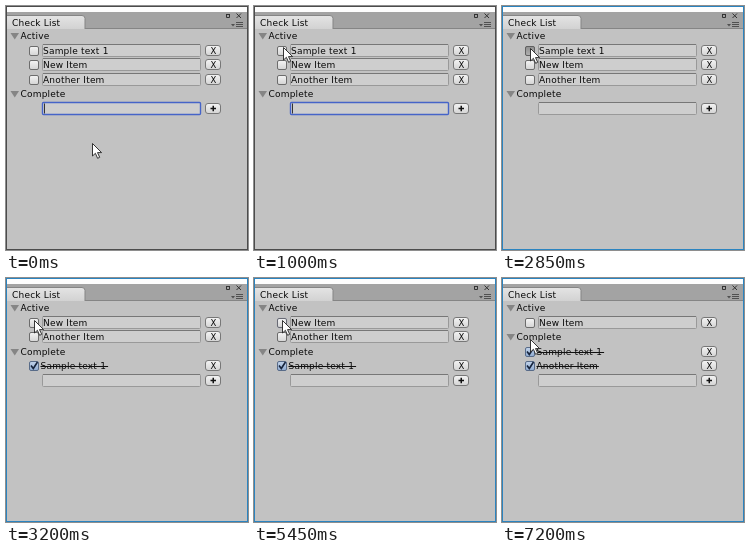
Animation of 242x244 px, one loop 8 s. Source, as an HTML page:

```html
<!DOCTYPE html>
<html lang="en">
<head>
<meta charset="utf-8">
<title>Check List</title>
<style>
html, body { margin: 0; width: 100%; height: 100%; overflow: hidden; background: #c2c2c2; }
svg { display: block; width: 242px; height: 244px; }
text { font: 9px "DejaVu Sans", Verdana, sans-serif; letter-spacing: .2px; fill: #080808; white-space: pre; }
.btn { font-size: 8.5px; letter-spacing: 0; text-anchor: middle; }
.anim { animation: 8s step-end infinite; }
#start { animation-name: start; }
#one { animation-name: one; }
#two { animation-name: two; }
#focus { animation-name: focus; }
#blur { animation-name: blur; }
#caret { animation-name: caret; }
#press1 { animation-name: press1; }
#press2 { animation-name: press2; }
#ring { animation: ring 8s linear infinite; }
#arrow { animation-name: arrow; }
#beam { animation-name: beam; }
#edge { animation-name: edge; }
@keyframes start { 0% { opacity: 1 } 38.125%, 100% { opacity: 0 } }
@keyframes one { 0% { opacity: 0 } 38.125% { opacity: 1 } 83.75%, 100% { opacity: 0 } }
@keyframes two { 0% { opacity: 0 } 83.75%, 100% { opacity: 1 } }
@keyframes focus { 0% { opacity: 1 } 35.625%, 100% { opacity: 0 } }
@keyframes blur { 0% { opacity: 0 } 35.625%, 100% { opacity: 1 } }
@keyframes caret { 0% { opacity: 1 } 8.125% { opacity: 0 } 12.5% { opacity: 1 } 15.625% { opacity: 0 } 23.75%, 100% { opacity: 1 } }
@keyframes press1 { 0% { opacity: 0 } 35.625%, 100% { opacity: 1 } }
@keyframes press2 { 0% { opacity: 0 } 81.25%, 100% { opacity: 1 } }
@keyframes ring { 0%, 43.75% { opacity: 0 } 46.25%, 62.5% { opacity: 1 } 68.75%, 100% { opacity: 0 } }
@keyframes edge { 0% { stroke: #4c4c4c } 35.625%, 100% { stroke: #2b84c0 } }
@keyframes beam { 0% { opacity: 0 } 4.375% { opacity: 1 } 6.25%, 100% { opacity: 0 } }
@keyframes arrow {
  0% { transform: translate(86px, 137px); opacity: 1 }
  2.5% { transform: translate(36px, 80px); opacity: 1 }
  4.375% { transform: translate(36px, 80px); opacity: 0 }
  6.25% { transform: translate(26px, 60px); opacity: 1 }
  8.125% { transform: translate(33px, 47px); opacity: 1 }
  8.75% { transform: translate(33px, 43px); opacity: 1 }
  10.625% { transform: translate(29px, 41px); opacity: 1 }
  15% { transform: translate(28px, 42px); opacity: 1 }
  71.25% { transform: translate(28px, 59px); opacity: 1 }
  73.125%, 100% { transform: translate(28px, 61px); opacity: 1 }
}
</style>
</head>
<body>
<svg id="stage" viewBox="0 0 242 244">
  <defs>
    <linearGradient id="light" x2="0" y2="1">
      <stop stop-color="#f4f4f4"/><stop offset="1" stop-color="#d4d4d4"/>
    </linearGradient>
    <linearGradient id="dark" x2="0" y2="1">
      <stop stop-color="#8f8f8f"/><stop offset="1" stop-color="#b0b0b0"/>
    </linearGradient>
    <linearGradient id="blue" x2="0" y2="1">
      <stop stop-color="#c2d3ea"/><stop offset="1" stop-color="#8fabd2"/>
    </linearGradient>
    <linearGradient id="tab" x2="0" y2="1">
      <stop stop-color="#e4e4e4"/><stop offset="1" stop-color="#d2d2d2"/>
    </linearGradient>
  </defs>
  <path fill="#c2c2c2" d="M0 0h242v244H0z"/>
  <path fill="#fdfdfd" d="M1 1h240v5H1z"/>
  <path fill="#a3a3a3" d="M1 6h240v17H1z"/>
  <path stroke="#858585" d="M79 22.500H241"/>
  <path fill="url(#tab)" stroke="#858585" d="M.5 23V9.500H76q3 0 3 3V23"/>
  <text x="6" y="20">Check List</text>
  <g fill="none" stroke="#333">
    <path d="M220.500 8.500h3v3h-3zM220 8.500h4M230.500 7.500l4.500 4.500M235 7.500l-4.500 4.500"/>
    <path d="M230 16.500h7M230 18.500h7M230 20.500h7" stroke="#505050"/>
  </g>
  <path fill="#505050" d="M225 18h4l-2 2.500z"/>
  <g id="ui"></g>
  <rect class="anim" id="edge" x=".5" y=".5" width="241" height="243" fill="none"/>
  <path class="anim" id="beam" fill="none" stroke="#222" d="M43.500 95.500h2l1 1 1-1h2M46.500 96.500v12M43.500 109.500h2l1-1 1 1h2"/>
  <path class="anim" id="arrow" fill="#fff" stroke="#222" stroke-width=".9" d="M.5.5V13l2.900-2.700 2.200 5 2.100-1-2.200-4.700h4.100z"/>
</svg>
<script>
// Row centres sit on half pixels so that borders stay crisp.
const rowY = i => Math.round(30.3 + i * 14.45) - .5;

const label = (x, y, s, cls = "") =>
  `<text class="${cls}" x="${x}" y="${y + 3.5}">${s}</text>`;

const box = (x, y, w, h, fill, stroke, r = 1, sw = 1) =>
  `<rect x="${x}" y="${y - h / 2}" width="${w}" height="${h}" rx="${r}" fill="${fill}" stroke="${stroke}" stroke-width="${sw}"/>`;

const layer = (id, body) => `<g class="anim" id="${id}">${body}</g>`;

const button = (y, s) =>
  box(199.5, y, 15, 10, "url(#light)", "#777", 2.5) + label(207.3, y - .5, s, "btn");

const plus = y =>
  button(y, "") + `<path stroke="#111" stroke-width="1.500" d="M204.500 ${y}h5.500M207.250 ${y - 2.75}v5.500"/>`;

const check = (y, fill = "url(#light)", stroke = "#6c6c6c") =>
  box(23.5, y + .5, 9, 9, fill, stroke, 1.5);

const field = (y, s = "") =>
  box(36.5, y, 158, 12, "#cecece", "#999", 1) +
  `<path stroke="#777" d="M37 ${y - 6}H194"/>` + label(37, y, s);

const heading = (i, s) => {
  const y = rowY(i);
  return `<path fill="#858585" d="M4.500 ${y - 2.5}h8.500l-4.250 6.500z"/>` + label(14.5, y, s);
};

const active = (i, s) => check(rowY(i)) + field(rowY(i), s) + button(rowY(i), "X");

const done = (i, s) => {
  const y = rowY(i);
  return check(y, "url(#blue)", "#586b88") +
    `<path fill="none" stroke="#17243c" stroke-width="1.600" d="M25 ${y}l2.300 3 4.200-6.500"/>` +
    label(34.5, y, s) +
    `<path stroke="#111" d="M34.500 ${y + 1}h${s.length * 5.2}"/>` + button(y, "X");
};

// Stack both sections from the top of the panel.
const list = (open, closed) =>
  heading(0, "Active") + open.map((s, i) => active(i + 1, s)).join("") +
  heading(open.length + 1, "Complete") +
  closed.map((s, i) => done(open.length + 2 + i, s)).join("");

const [a, b, c] = ["Sample text 1", "New Item", "Another Item"];
const entry = rowY(5);
const pressed = (id, i) => layer(id, check(rowY(i), "url(#dark)", "#606060"));

document.getElementById("ui").innerHTML =
  layer("start", list([a, b, c], []) + pressed("press1", 1)) +
  layer("one", list([b, c], [a]) +
    `<g id="ring">${box(23.5, rowY(1) + .5, 9, 9, "none", "#4965c4", 1.5, 1.3)}</g>` +
    pressed("press2", 2)) +
  layer("two", list([b], [a, c])) +
  layer("blur", field(entry)) +
  layer("focus", box(36.5, entry, 158, 12, "#cecece", "#4664c8", 1, 1.4) +
    `<path class="anim" id="caret" stroke="#333" d="M38.500 ${entry - 5}v10"/>`) +
  plus(entry);
</script>
</body>
</html>
```
